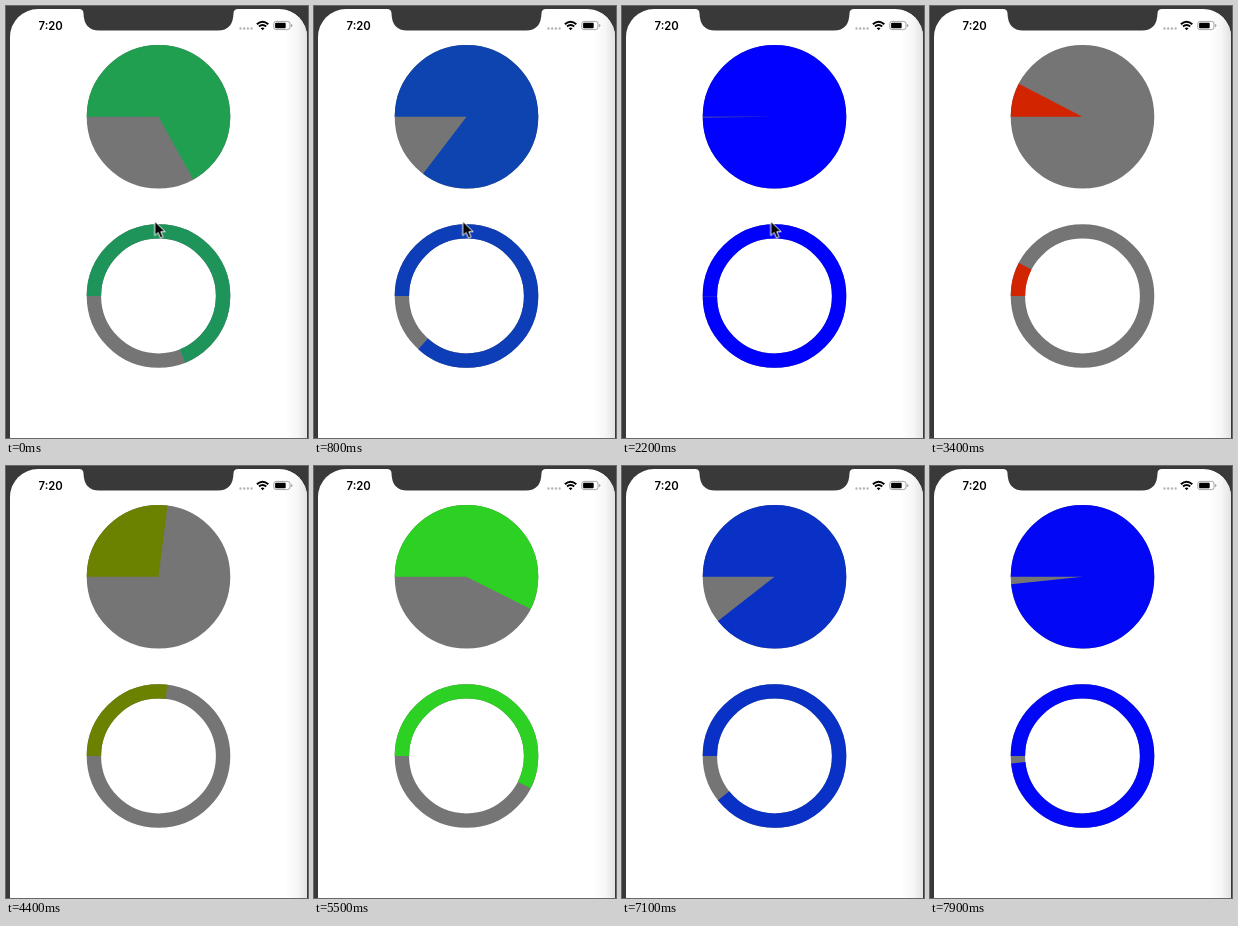
Write an HTML page that moves like this. It is 302x432 px and loops after 8 s.

```html
<!DOCTYPE html>
<html lang="en">
<head>
<meta charset="utf-8">
<title>Progress charts</title>
<style>
  html, body { margin: 0; width: 100%; height: 100%; overflow: hidden; background: #393939; }
  svg { display: block; width: 302px; height: 432px; }
  .time { font: 600 11.3px Inter, Roboto, sans-serif; }
  .arc { fill: none; }
  #cursor { animation: leave 8s step-end infinite; }
  @keyframes leave { 0% { opacity: 1; } 37.5%, 100% { opacity: 0; } }
</style>
</head>
<body>
<svg viewBox="0 0 302 432">
  <defs>
    <linearGradient id="edge">
      <stop offset="0" stop-color="#fff"/>
      <stop offset=".55" stop-color="#f7f7f7"/>
      <stop offset="1" stop-color="#e2e2e2"/>
    </linearGradient>
    <clipPath id="screen"><rect x="4" y="3" width="297" height="480" rx="28"/></clipPath>
  </defs>
  <rect width="302" height="432" fill="#393939"/>
  <g clip-path="url(#screen)">
    <rect width="302" height="432" fill="#fff"/>
    <rect x="279" width="22" height="432" fill="url(#edge)"/>
  </g>
  <path fill="#393939" d="M73 0V3Q77.5 3 77.5 7.5Q78 24.5 93 24.5H212Q227 24.500 227.500 7.500Q227.500 3 232 3V0Z"/>

  <text class="time" x="32.6" y="23.7">7:20</text>
  <path d="M234.5 22.5H247" stroke="#b4b4b4" stroke-width="2.4" stroke-linecap="round" stroke-dasharray="0 3.7"/>
  <g fill="none" stroke="#000" stroke-width="2">
    <path d="M250.900 18.300Q256.600 13.100 262.300 18.300"/>
    <path d="M253 20.600Q256.600 17.500 260.200 20.600"/>
  </g>
  <path d="M256.600 24.200L254.700 22.300Q256.600 20.800 258.500 22.300Z"/>
  <g transform="translate(.4 0)">
    <rect x="267.4" y="15.4" width="16.2" height="8.2" rx="2.3" fill="none" stroke="#999" stroke-width=".9"/>
    <rect x="268.7" y="16.7" width="10.6" height="5.6" rx="1"/>
    <path d="M284.700 18V21.200Q286 20.800 286 19.600T284.700 18Z" fill="#999"/>
  </g>

  <g id="charts"></g>

  <path id="cursor" transform="translate(148.700 215.300)" d="M0 0V14.400L3.300 11.300L5.700 16.800L8.300 15.700L6 10.400H10.300Z"
        fill="#000" stroke="#fff"/>
</svg>
<script>
  const LOOP = 8000, STEP = 100, DURATION = 6000;
  const RESTART = 2300, SECOND_START = 2240;
  const FIRST_START = 2395 - DURATION, RING_LEAD = 75;
  const STALL = { from: 5500, length: 700, lag: 220 };

  // Evenly spaced from empty to full.
  const COLORS = [[255, 0, 0], [112, 119, 0], [52, 248, 0], [24, 116, 119], [0, 0, 255]];

  const clamp = x => Math.min(1, Math.max(0, x));

  // cubic-bezier(.42, 0, .58, 1), solved for x by bisection.
  function easeInOut(x) {
    let low = 0, high = 1, s;
    for (let i = 0; i < 24; i++) {
      s = (low + high) / 2;
      const bx = 3 * (1 - s) * s * (.42 * (1 - s) + .58 * s) + s ** 3;
      if (bx < x) low = s; else high = s;
    }
    return s * s * (3 - 2 * s);
  }

  function progress(t, lead) {
    const lag = STALL.lag * clamp((t - STALL.from) / STALL.length);
    const start = t < RESTART ? FIRST_START - lead : SECOND_START;
    return easeInOut(clamp((t - lag - start) / DURATION));
  }

  function colorAt(p) {
    const x = p * (COLORS.length - 1), i = Math.min(Math.floor(x), COLORS.length - 2);
    const mix = COLORS[i].map((c, k) => Math.round(c + (COLORS[i + 1][k] - c) * (x - i)));
    return `rgb(${mix})`;
  }

  function addChart(cy, r, width) {
    const circle = stroke => {
      const el = document.createElementNS('http://www.w3.org/2000/svg', 'circle');
      const attrs = { class: 'arc', cx: 152.5, cy, r, stroke, 'stroke-width': width,
        pathLength: 1, transform: `rotate(180 152.5 ${cy})` };
      for (const key in attrs) el.setAttribute(key, attrs[key]);
      return document.getElementById('charts').appendChild(el);
    };
    circle('#757575');
    const arc = circle('#00f');
    return p => {
      arc.setAttribute('stroke', colorAt(p));
      arc.setAttribute('stroke-dasharray', `${p} 2`);
    };
  }

  const drawPie = addChart(110.7, 35.9, 71.8);
  const drawRing = addChart(290, 64.6, 14.4);

  function frame(now) {
    const t = Math.floor(now % LOOP / STEP) * STEP;
    drawPie(progress(t, 0));
    drawRing(progress(t, RING_LEAD));
    requestAnimationFrame(frame);
  }
  frame(0);
</script>
</body>
</html>
```
